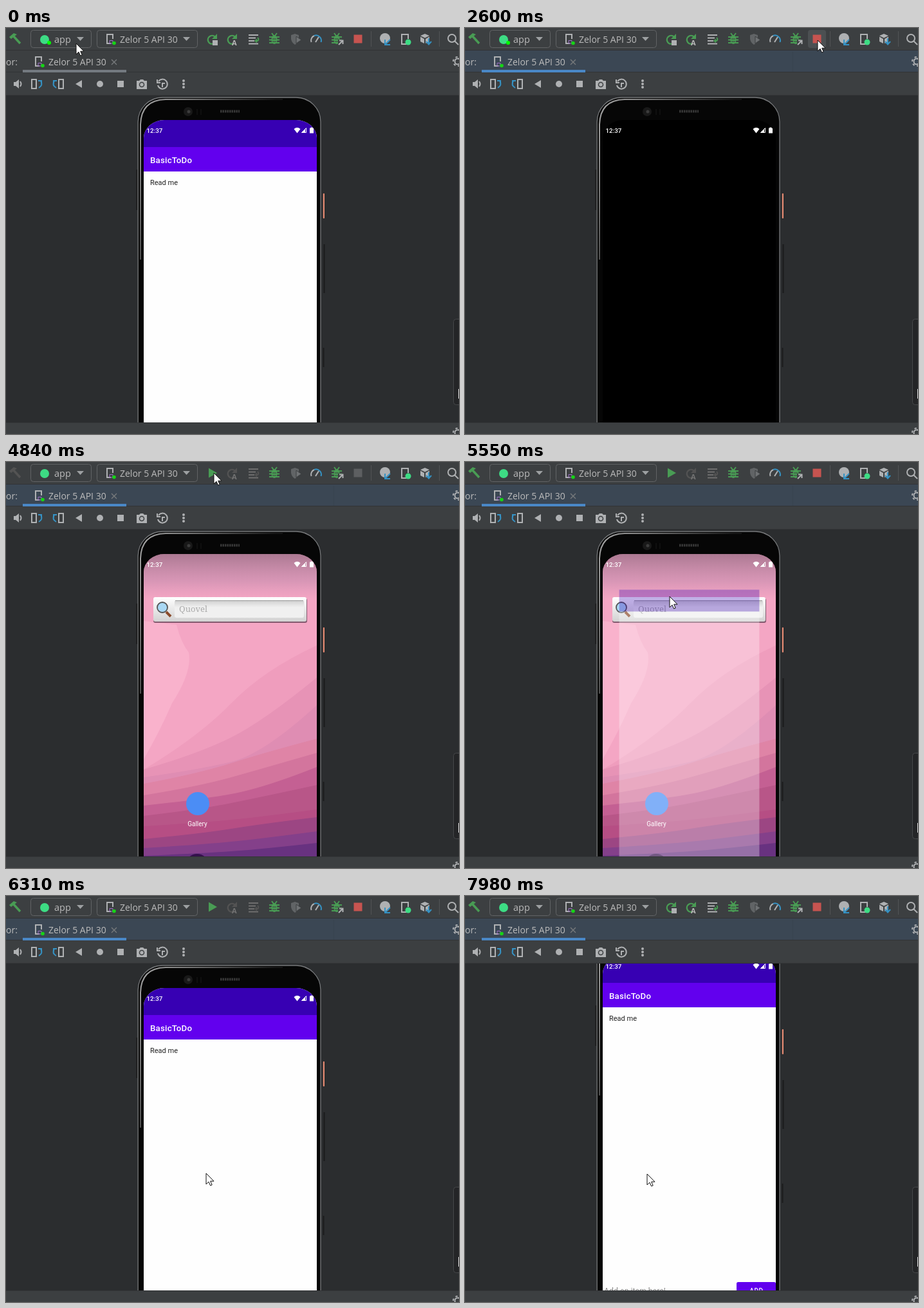
An HTML page for the animation above (8 s loop, 704x631 px).

```html
<!DOCTYPE html>
<html lang="en">
<head>
<meta charset="utf-8">
<title>Emulator run</title>
<style>
html, body { margin: 0; width: 100%; height: 100%; overflow: hidden; background: #2b2d2f; }
svg { display: block; }
.ui { font: 14px "Open Sans", sans-serif; fill: #bbb; }
.phone { font-family: Roboto, sans-serif; }
.line { fill: none; stroke: #afb1b3; stroke-width: 2; }
.g { fill: #afb1b3; }
.green { fill: #499c54; }
.blue { fill: none; stroke: #3592c4; stroke-width: 2; }
.off { filter: grayscale(1) brightness(.62); }
</style>
</head>
<body>
<svg width="704" height="631" viewBox="0 0 704 631">
<defs>
  <clipPath id="view"><rect y="105" width="704" height="508"/></clipPath>
  <clipPath id="glass"><rect x="214" y="143" width="269" height="583" rx="32" ry="28"/></clipPath>
  <linearGradient id="edge" x2="1" y2=".6">
    <stop stop-color="#aaa"/><stop offset=".25" stop-color="#777"/><stop offset=".7" stop-color="#161616"/>
  </linearGradient>
  <linearGradient id="shade" x2="0" y2="1">
    <stop stop-color="#7b5a70" stop-opacity=".6"/>
    <stop offset=".6" stop-color="#b080a2" stop-opacity=".4"/>
    <stop offset="1" stop-color="#c98aac" stop-opacity="0"/>
  </linearGradient>
  <linearGradient id="bar" x2="0" y2="1"><stop stop-color="#fff"/><stop offset="1" stop-color="#d2d2d2"/></linearGradient>
  <linearGradient id="field" x2="0" y2="1"><stop stop-color="#cfcfcf"/><stop offset=".4" stop-color="#f0f0f0"/></linearGradient>
  <g id="bug" class="green">
    <ellipse cy="1" rx="4.6" ry="7"/>
    <path d="M-8-3H8M-8 1.5H8M-8 6H8M-4-9L-1-5M4-9L1-5" stroke="#499c54" stroke-width="2"/>
    <path d="M-3 0H3M-3 4H3" stroke="#3c3f41"/>
  </g>
  <path id="drop" d="M0 0H11L5.5 6Z" fill="#9da0a2"/>
  <g id="device">
    <path class="line" stroke-width="1.6" d="M7 15H1V1H10V8"/>
    <path d="M5 10.500H10V15H5Z" fill="none" stroke="#9b6fc4"/>
    <circle cx="12" cy="14.500" r="2.800" fill="#16d416"/>
  </g>
  <g id="gear">
    <circle r="4.5" class="line" stroke-width="3"/>
    <circle r="7" class="line" stroke-width="3" stroke-dasharray="3.3 4"/>
  </g>
  <g id="again" fill="none" stroke="#499c54" stroke-width="2.4">
    <path d="M2 6.4A6.4 6.4 0 1 1 5-4"/><path d="M8-9V-1H0Z" fill="#499c54" stroke="none"/>
  </g>
</defs>

<g clip-path="url(#view)">
  <rect y="105" width="704" height="508" fill="#2b2d2f"/>
  <g id="phone" class="phone">
    <path d="M203.5 220V283" stroke="#1c1c1d" stroke-width="2"/>
    <path d="M494.5 336V412M493.5 497V527" stroke="#1b1b1c" stroke-width="2"/>
    <rect x="492.800" y="257" width="2.200" height="39" rx="1" fill="#e58a72"/>
    <rect x="205.200" y="108" width="283.800" height="640" rx="38" fill="#060606" stroke="#77797b" stroke-width="1.300"/>
    <path d="M209 360V150Q210 112 248 111H430" fill="none" stroke="url(#edge)" stroke-width="2"/>
    <circle cx="283" cy="130" r="7" fill="#191919"/><circle cx="284" cy="130" r="2.5" fill="#3c3c3c"/>
    <path d="M297 126V135M303 126V135" stroke="#191919"/>
    <path d="M333 129.5H363" stroke="#383838" stroke-width="4" stroke-dasharray="2.5 1"/>
    <g clip-path="url(#glass)">
      <rect x="214" y="143" width="269" height="583"/>
      <g id="home">
        <rect x="214" y="143" width="269" height="583" fill="#f4a6c4"/>
        <path d="M214 247L265 253Q272 281 284 296Q290 325 258 375Q240 417 214 462Z" fill="#f9b2cc"/>
        <g id="bands"></g>
        <rect x="214" y="143" width="269" height="72" fill="url(#shade)"/>
        <rect x="229" y="212" width="239" height="38" rx="3" fill="#54394a" opacity=".7"/>
        <rect x="229" y="210" width="238" height="38" rx="3" fill="url(#bar)"/>
        <rect x="262" y="215" width="201" height="27" rx="3" fill="url(#field)"/>
        <path d="M263 215.500H462" stroke="#999"/>
        <path d="M249 233L256 240" stroke="#8a4a2a" stroke-width="4"/>
        <circle cx="243" cy="226" r="8" fill="#a9d8f4" stroke="#555" stroke-width="1.8"/>
        <text x="269" y="233" font-family="Noto Serif, serif" font-size="13" fill="#aaa">Quovel</text>
        <circle cx="298" cy="531" r="18" fill="#4b8df5"/>
        <text x="297.500" y="566" font-size="10" text-anchor="middle" fill="#fff">Gallery</text>
        <circle cx="297" cy="627" r="18" fill="#35104c"/>
      </g>
      <g id="launch">
        <rect x="214" y="143" width="269" height="583" fill="#fefefe"/>
        <rect x="214" y="143" width="269" height="42" fill="#3700b3"/>
      </g>
      <g id="app">
        <rect x="214" y="143" width="269" height="583" fill="#fefefe"/>
        <rect x="214" y="143" width="269" height="42" fill="#3700b3"/>
        <rect x="214" y="185" width="269" height="38" fill="#6200ee"/>
        <text x="224" y="209.500" font-size="13.300" font-weight="500" letter-spacing=".2" fill="#fff">BasicToDo</text>
        <text x="224" y="244" font-size="11" fill="#222">Read me</text>
        <text x="216" y="668" font-size="12.300" fill="#888">Add an item here!</text>
        <rect x="422" y="650" width="61" height="26" rx="2.500" fill="#6200ee"/>
        <text x="453" y="667" font-size="10" font-weight="500" letter-spacing=".6" text-anchor="middle" fill="#fff">ADD</text>
      </g>
      <g fill="#fff">
        <text x="218.500" y="163" font-size="9.800" font-weight="500">12:37</text>
        <path d="M447.500 157Q452.500 152.500 457.500 157L452.500 163.500Z"/>
        <path d="M459.500 162.500L466.500 155.500V162.500Z" fill="none" stroke="#fff"/><path d="M459 163L465 157V163Z"/>
        <path d="M472 155.500H473.500V154.500H476.500V155.500H478V163.500H472Z"/>
      </g>
    </g>
  </g>
  <rect x="695.500" y="452.500" width="20" height="133" rx="4" fill="#242527" stroke="#46484a"/>
  <path d="M703.500 561V576" stroke="#ddd"/>
</g>

<g class="ui">
  <rect width="704" height="34" fill="#3c3f41"/>
  <rect y="34" width="704" height="1" fill="#313335"/>
  <rect id="tabs" y="35" width="704" height="33" fill="#3c3f41"/>
  <path id="split" d="M509.500 37V68" stroke="#38444f"/>
  <rect y="68" width="704" height="1" fill="#313335"/>
  <rect y="69" width="704" height="35" fill="#3c3f41"/>
  <rect y="104" width="704" height="1" fill="#323436"/>
  <rect y="613" width="704" height="18" fill="#3c3f41"/>
  <rect y="613" width="704" height="1" fill="#333537"/>
  <rect id="mark" x="26" y="65" width="161" height="4"/>
  <rect id="hover" y="3" width="28" height="28" rx="4" fill="#4c5052"/>

  <g id="hammer">
    <path class="green" d="M5 14L12 8L17 10L13 13L8 17Z"/>
    <path d="M11 12L22 24" stroke="#499c54" stroke-width="3.500"/>
  </g>
  <g fill="none" stroke="#616365">
    <rect x="38.500" y="3.500" width="94" height="27" rx="4"/>
    <rect x="141.500" y="3.500" width="156" height="27" rx="4"/>
    <path d="M567.500 5V29M673.500 5V29" stroke="#515355"/>
  </g>
  <circle cx="60" cy="18" r="7" fill="#3ddc84"/>
  <circle id="dot" cx="67" cy="23" r="3" fill="#0f0"/>
  <text x="75" y="22.500" font-size="14.500">app</text>
  <use href="#drop" x="110" y="14"/><use href="#drop" x="275" y="14"/>
  <use href="#device" x="156" y="9"/><text x="177" y="22.500">Zelor 5 API 30</text>

  <g id="rerun"><use href="#again" x="320" y="18"/><path class="g" d="M321 19H329V27H321Z"/></g>
  <path id="run" class="green" d="M315 9.500L328 17L315 24.500Z"/>
  <g id="apply">
    <use href="#again" x="351" y="18"/>
    <text x="351" y="27" font-size="11" font-weight="700">A</text>
    <path class="line" d="M377 11H392M377 15.500H388M377 20H386M377 24.500H392"/>
    <path d="M388 20H391A3 3 0 0 0 391 15" fill="none" stroke="#499c54" stroke-width="2"/>
    <path class="green" d="M386 20L390 16.500V23.500Z"/>
  </g>
  <use href="#bug" x="417" y="17"/>
  <path d="M443 11L449 9L455 11V17Q454 23 449 26Q444 23 443 17Z" fill="#616466"/>
  <path d="M451 13L459 18.500L451 24Z" fill="#6f7274" stroke="#3c3f41"/>
  <path class="line" stroke-width="2.600" d="M474.500 22A8 8 0 0 1 479 12"/>
  <path class="blue" stroke-width="2.600" d="M479 12A8 8 0 0 1 489.500 22"/>
  <path class="line" d="M481 22L486 14"/>
  <use href="#bug" x="514" y="17"/>
  <path d="M516 18H526V28H516Z" fill="#3c3f41"/><path class="line" d="M517 26L523 20M518 19.500H523.500V25"/>
  <rect id="stop" x="540.500" y="10.500" width="13" height="13"/>
  <circle cx="589" cy="16" r="8" class="g"/>
  <path class="blue" d="M597 18L590 25M589 18V26H597"/>
  <path class="line" d="M624 25H615V10H625V17"/><circle cx="625" cy="22" r="4.500" fill="#3ddc84"/>
  <path class="g" d="M644 12L651 9L658 12L651 15.500ZM644 13.500L650 17V24L644 21ZM658 13.500L652 17V24L658 21Z"/>
  <path class="blue" stroke-width="2.500" d="M657 16V25M653 21L657 25.500L661 21"/>
  <circle cx="693" cy="16" r="6" class="line"/><path class="line" d="M697 20L703 26"/>

  <text x="18" y="58" text-anchor="end">tor:</text>
  <use href="#device" x="45" y="44"/><text x="66" y="58">Zelor 5 API 30</text>
  <path d="M164 49L172 57M172 49L164 57" stroke="#777a7c" stroke-width="1.400"/>
  <use href="#gear" x="702" y="52"/><use href="#gear" x="702" y="629"/>

  <path class="g" d="M12 84H15L20 80V94L15 90H12Z"/><path class="line" stroke-width="1.500" d="M22 83Q25 87 22 91"/>
  <path class="line" d="M40 80H47V94H40Z"/><path class="blue" d="M51 93Q58 89 54 82M50 82H55V86"/>
  <path class="line" d="M82 80H89V94H82Z"/><path class="blue" d="M78 93Q71 89 75 82M79 82H74V86"/>
  <path class="g" d="M108 87L118 81V93Z"/><circle cx="146" cy="87" r="5" class="g"/>
  <rect x="173" y="82" width="10" height="10" class="g"/>
  <path class="g" d="M203 82H207L209 80H213L215 82H219V95H203Z"/>
  <circle cx="211" cy="88" r="3.500" fill="none" stroke="#3c3f41" stroke-width="1.500"/>
  <path class="line" d="M237 83A7.500 7.500 0 1 1 236 89M235 80V85H240M243 92V86H247"/>
  <g class="g"><circle cx="276" cy="82" r="2"/><circle cx="276" cy="87" r="2"/><circle cx="276" cy="92" r="2"/></g>

  <g id="tip">
    <rect x="332.500" y="54.500" width="160" height="38" fill="#4b4d4d" stroke="#636569"/>
    <text x="343" y="78.500">Run 'app'</text><text x="413" y="78.500" fill="#919191">Shift+F10</text>
  </g>
</g>
<path id="cursor" d="M0 0V17L4 13.200L6.600 19L9.200 18L6.700 12.200H12Z" fill="#fff" stroke="#111"/>
</svg>
<script>
const $ = id => document.getElementById(id);
const show = (id, on) => { $(id).style.display = on ? '' : 'none'; };

// Wallpaper bands: colour, then edge height at left, middle and right
const bands = [
  ['#ef9dbd', 478, 375, 285], ['#e793b6', 478, 428, 335], ['#df8db3', 490, 466, 378],
  ['#df84a6', 500, 468, 430], ['#d3759d', 518, 490, 452], ['#c46093', 534, 516, 474],
  ['#b85688', 550, 530, 502], ['#b64e84', 566, 556, 540], ['#9c4683', 586, 570, 552],
  ['#84408a', 600, 590, 574], ['#683280', 612, 605, 592]
];
$('bands').innerHTML = bands.map(([c, l, m, r]) =>
  `<path fill="${c}" d="M214 ${l}Q300 ${(l + m) / 2} 350 ${m}T483 ${r}V726H214Z"/>`).join('');

// Each row: start time, then the values held until the next row
const cursor = [
  [0, 109, 24], [150, 150, 27], [270, 215, 31], [390, 285, 33], [510, 330, 34],
  [1910, 499, 29], [2060, 516, 23], [2210, 545, 23], [2360, 548, 19],
  [3040, 483, 30], [3180, 440, 36], [3300, 385, 33], [3430, 335, 24], [3550, 323, 19],
  [4720, 323, 17], [5110, 318, 179], [5260, 318, 209],
  [6070, 316, 300], [6190, 313, 380], [6310, 311, 431], [6440, 303, 484],
  [6730, 292, 400], [6850, 279, 321], [6990, 288, 430], [7120, 294, 524], [7270, 283, 432]
];
const hover = [[0, 0], [2060, 501], [2210, 533], [3040, 0], [3430, 306], [4840, 0]];
const launch = [[0, 1, 0], [5550, .81, .3], [5690, .94, .75], [5810, 1, 1], [6070, 1, 0]];
const scroll = [[0, 0], [7420, 10], [7570, 20], [7720, 30], [7850, 40], [7980, 50]];
const at = (track, t) => track.findLast(row => row[0] <= t).slice(1);
const within = (t, from, to) => t >= from && t < to;

function draw(now) {
  const t = now % 8000;
  const [x, y] = at(cursor, t), [button] = at(hover, t);
  const [scale, alpha] = at(launch, t), [offset] = at(scroll, t);
  const focus = t >= 2360, idle = within(t, 3040, 6440);

  $('cursor').setAttribute('transform', `translate(${x} ${y})`);
  $('phone').setAttribute('transform', `translate(0 ${-offset})`);
  $('launch').setAttribute('transform', `translate(348.5 434.5) scale(${scale}) translate(-348.5 -434.5)`);
  $('launch').setAttribute('opacity', alpha);
  $('hover').setAttribute('x', button);
  $('tabs').setAttribute('fill', focus ? '#3b4754' : '#3c3f41');
  $('mark').setAttribute('fill', focus ? '#4a88c7' : '#747a80');
  $('stop').setAttribute('fill', within(t, 3040, 5550) ? '#5d5f61' : '#c75450');
  $('hammer').classList.toggle('off', within(t, 4840, 5550));
  $('apply').classList.toggle('off', idle);

  show('hover', button);
  show('split', focus);
  show('dot', t < 3040);
  show('run', idle);
  show('rerun', !idle);
  show('tip', within(t, 3980, 4720));
  show('home', within(t, 2750, 6070));
  show('app', !within(t, 2480, 6070));
  requestAnimationFrame(draw);
}
draw(0);
</script>
</body>
</html>
```
